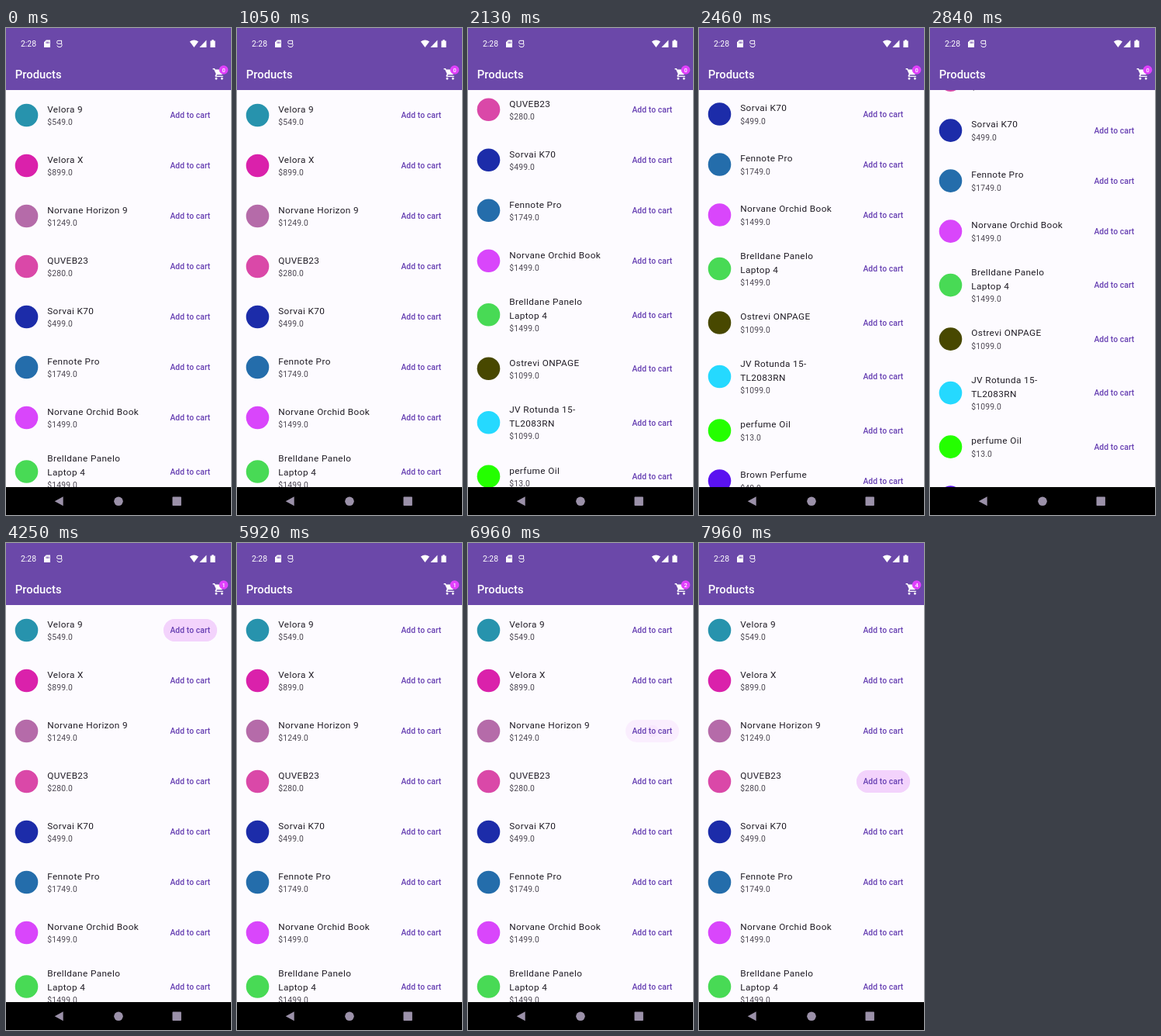
Recreate the animation shown at these times as an HTML page. Size 290 by 628 pixels, loop 8000 ms.

```html
<!DOCTYPE html>
<html lang="en">
<head>
<meta charset="utf-8">
<title>Products</title>
<style>
  html, body { margin: 0; width: 100%; height: 100%; overflow: hidden; background: #fdfbff; }
  svg { display: block; width: 290px; height: 628px; font-family: Roboto, sans-serif; }
  .name { font-size: 11.8px; letter-spacing: .37px; fill: #211d26; }
  .price { font-size: 10.34px; letter-spacing: .18px; fill: #4c4752; }
  .add { font-size: 10.34px; font-weight: 500; letter-spacing: .07px; fill: #663fb2; }
  .title { font-size: 14.8px; font-weight: 500; }
  .clock { font-size: 10.4px; }
  .count { font-size: 7.4px; font-weight: 500; text-anchor: middle; }
</style>
</head>
<body>
<svg viewBox="0 0 290 628">
  <defs>
    <clipPath id="view"><rect y="80" width="290" height="512"/></clipPath>
    <clipPath id="pill"><rect x="203" y="-14.6" width="69" height="29.2" rx="14.6"/></clipPath>
  </defs>
  <rect width="290" height="628" fill="#fdfbff"/>
  <g clip-path="url(#view)">
    <g id="list">
      <g id="ripple" clip-path="url(#pill)" fill="#f3d3fc">
        <rect x="203" y="-15" width="69" height="30" opacity=".6"/>
        <circle id="splash" cx="238"/>
      </g>
      <g id="rows"></g>
    </g>
  </g>

  <rect width="290" height="80" fill="#6b48a9"/>
  <g fill="#fff">
    <text class="clock" x="19" y="24.2">2:28</text>
    <path d="M51.8 15.5H57V25H49V18.3ZM51.6 17.5V20H52.5V17.5ZM53.2 17.5V20H54.1V17.5ZM54.8 17.5V20H55.7V17.5Z" fill-rule="evenodd"/>
    <path d="M72 16.3H67Q65.8 16.3 65.8 17.6V19.2Q65.8 20.3 67 20.3H71Q72 20.3 72 21.4V22.6Q72 24.6 69 24.6Q66.3 24.6 65.8 22.6M71.6 16.3V20.3" fill="none" stroke="#fff" stroke-width="1"/>
    <path d="M236.8 17.6Q242.4 13.2 248 17.6L242.4 25Z"/>
    <path d="M258.4 15.5V25H249.4Z"/>
    <path d="M265.2 16.4V15.3H267.8V16.4H269.6V25H263.4V16.4Z"/>
    <text class="title" x="11.8" y="65.4">Products</text>
    <path transform="translate(265.8 50.6) scale(.735)" d="M7 18a2 2 0 1 0 0 4a2 2 0 0 0 0-4ZM1 2V4H3L6.6 11.6L5.25 14C4.5 15.4 5.5 17 7 17H19V15H7.4L8.5 13H16C16.7 13 17.4 12.6 17.7 12L21.3 5.5C21.7 4.8 21.2 4 20.4 4H5.2L4.3 2ZM17 18a2 2 0 1 0 0 4a2 2 0 0 0 0-4Z"/>
    <circle cx="280.5" cy="54" r="5.8" fill="#e040fb"/>
    <text class="count" id="count" x="280.5" y="56.6">0</text>
  </g>

  <rect y="592" width="290" height="36"/>
  <g fill="#9b91a9">
    <path d="M73.7 604.3V616.3L62.7 610.3Z"/>
    <circle cx="145" cy="610.3" r="5.8"/>
    <rect x="214.5" y="604.6" width="11.4" height="11.4" rx=".8"/>
  </g>
</svg>
<script>
const LOOP = 8000;
const products = [
  ["Velora 9", "549", "#2793ad"],
  ["Velora X", "899", "#da21ab"],
  ["Norvane Horizon 9", "1249", "#b56ba9"],
  ["QUVEB23", "280", "#da48a8"],
  ["Sorvai K70", "499", "#1c2ca9"],
  ["Fennote Pro", "1749", "#246dab"],
  ["Norvane Orchid Book", "1499", "#d946fb"],
  ["Brelldane Panelo|Laptop 4", "1499", "#48da55"],
  ["Ostrevi ONPAGE", "1099", "#484800"],
  ["JV Rotunda 15-|TL2083RN", "1099", "#25d9ff"],
  ["perfume Oil", "13", "#24ff00"],
  ["Brown Perfume", "40", "#5a12f0"]
];
// [time, scroll offset]
const scrollKeys = [[0, 0], [1450, 0], [2130, 202.3], [2480, 262], [2840, 240.4], [3620, 0], [LOOP, 0]];
// [time, row]
const taps = [[4050, 0], [6120, 1], [6920, 2], [7700, 3]];

const $ = id => document.getElementById(id);
const clamp = x => Math.min(1, Math.max(0, x));
const ease = x => x * x * (3 - 2 * x);
const label = (cls, x, y, s) => `<text class="${cls}" x="${x}" y="${y}">${s}</text>`;

const centers = [];
let rowTop = 80, markup = "";
for (const [name, price, color] of products) {
  const lines = name.split("|");
  const height = lines.length > 1 ? 74 : 65;
  const mid = rowTop + height / 2;
  const first = mid - (lines.length > 1 ? 12.8 : 3.6);
  const last = first + 17.8 * (lines.length - 1);
  centers.push(mid);
  markup += `<circle cx="26.5" cy="${mid}" r="14.8" fill="${color}"/>` +
    lines.map((s, i) => label("name", 53.2, first + 17.8 * i, s)).join("") +
    label("price", 53.2, last + 16.3, `$${price}.0`) +
    label("add", 211.4, mid + 3.9, "Add to cart");
  rowTop += height;
}
$("rows").innerHTML = markup;

function scrollAt(t) {
  const i = scrollKeys.findIndex(k => k[0] > t);
  const [t0, a] = scrollKeys[i - 1], [t1, b] = scrollKeys[i];
  return a + (b - a) * ease((t - t0) / (t1 - t0));
}

function draw() {
  const t = performance.now() % LOOP;
  $("list").setAttribute("transform", `translate(0 ${-scrollAt(t)})`);
  $("count").textContent = taps.filter(([at]) => t >= at + 80).length;

  const [at, row] = taps.filter(([at]) => t >= at).pop() || [-LOOP, 0];
  const age = t - at;
  $("ripple").setAttribute("transform", `translate(0 ${centers[row]})`);
  $("ripple").setAttribute("opacity", clamp(age / 80) * clamp((600 - age) / 250));
  $("splash").setAttribute("r", 38 * clamp(age / 200));
  requestAnimationFrame(draw);
}
draw();
</script>
</body>
</html>
```
